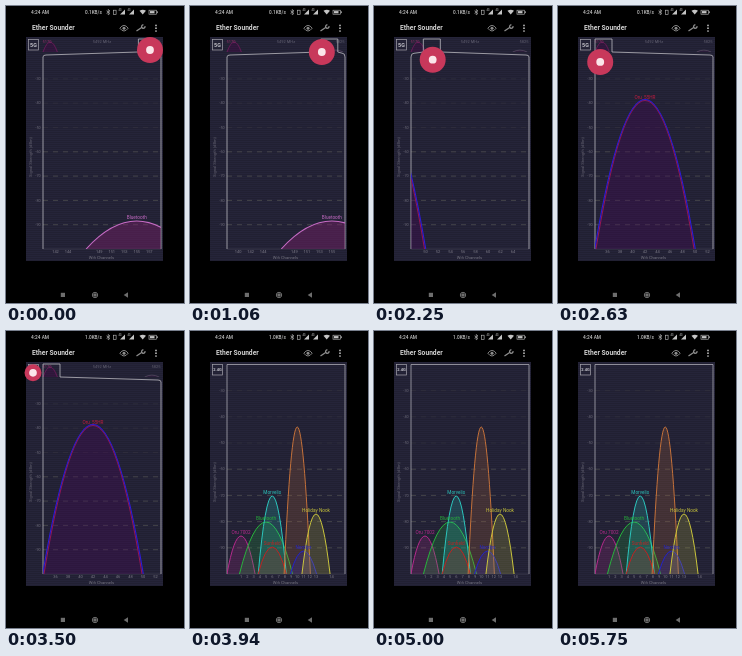
Write an HTML page with a canvas that moves like this. It is 178 px wide and 297 px high and loops after 5.81 s.

```html
<!DOCTYPE html>
<html lang="en">
<head>
<meta charset="utf-8">
<style>
  html, body { margin: 0; width: 100%; height: 100%; overflow: hidden; background: #000; }
  canvas { display: block; width: 100vw; height: 100vh; }
</style>
</head>
<body>
<canvas id="stage"></canvas>
<script>
const W = 178, H = 297, LOOP = 5810, STEP = 62.5;
const LEFT = 37, RIGHT = 155, FLOOR = 243, CH = 6.25; // plot edges, pixels per channel
const STRIP = { top: 33, bottom: 46, first: 34, scale: 0.9, box: 17 };
const SWITCH_AT = 3680;

const canvas = document.getElementById('stage');
const c = canvas.getContext('2d');

const wide = [
  { ch: 42, half: 7.85, peak: 148.5, color: '#a01a50', fill: 'rgba(80,10,80,.22)', name: 'Oru_55HR', label: '#c01c40' },
  { ch: 42, half: 8.05, peak: 149.5, color: '#2c1cd8', fill: 'rgba(60,0,100,.14)' },
  { ch: 155, half: 8.1, peak: 28, color: '#c56bc4', fill: 'rgba(130,30,110,.4)', name: 'Bluetooth', label: '#c56bc4' }
];
const narrow = [
  { ch: 1, half: 2.25, peak: 38, color: '#b52a8c', name: 'Oru 7002' },
  { ch: 5, half: 4.25, peak: 52, color: '#27b33c', name: 'Bluetooth' },
  { ch: 6, half: 2.25, peak: 78, color: '#2cc5bd', name: 'Morvelis' },
  { ch: 6, half: 2.25, peak: 27, color: '#c02222', name: 'Sunfield' },
  { ch: 10, half: 2.1, peak: 147, color: '#c4713a' },
  { ch: 11, half: 2.1, peak: 23, color: '#2323c8', name: 'Nordlys' },
  { ch: 13, half: 2.25, peak: 60, color: '#c9c43c', name: 'Holiday Nook' }
];

// Linear interpolation through [time, value] points.
function track(points, t) {
  let i = 1;
  while (i < points.length - 1 && t > points[i][0]) i++;
  const [t0, a] = points[i - 1], [t1, b] = points[i];
  return a + (b - a) * Math.min(1, Math.max(0, (t - t0) / (t1 - t0)));
}

const boxPath = [[0, 132.4], [690, 138], [1060, 131], [1810, 71], [2500, 37]];
const touchX = [[0, 144], [690, 147.5], [1060, 132], [1810, 78], [2630, 42]];
const touchY = [[0, 44], [1060, 46], [1810, 51], [2630, 56]];
const dragSize = [[2800, 13], [2950, 0]];
const tapSize = [[3370, 0], [3500, 8.5], [3560, 8.5], [3690, 0]];

function text(s, x, y, size, color, align = 'center', weight = 400) {
  c.font = `${weight} ${size}px Roboto, sans-serif`;
  c.textAlign = align;
  c.textBaseline = 'middle';
  c.fillStyle = color;
  c.fillText(s, x, y);
}

function line(points, color, width = 0.7) {
  c.beginPath();
  points.forEach(([x, y]) => c.lineTo(x, y));
  c.strokeStyle = color;
  c.lineWidth = width;
  c.stroke();
}

function polygon(points, color) {
  c.beginPath();
  points.forEach(([x, y]) => c.lineTo(x, y));
  c.fillStyle = color;
  c.fill();
}

function disc(x, y, r, color) {
  c.beginPath();
  c.arc(x, y, r, 0, 7);
  c.fillStyle = color;
  c.fill();
}

function clip(x, y, w, h, draw) {
  c.save();
  c.beginPath();
  c.rect(x, y, w, h);
  c.clip();
  draw();
  c.restore();
}

function parabola(x, floor, half, peak, color, fill, width = 1) {
  c.beginPath();
  c.moveTo(x - half, floor);
  c.quadraticCurveTo(x, floor - 2 * peak, x + half, floor);
  c.fillStyle = fill;
  c.fill();
  c.strokeStyle = color;
  c.lineWidth = width;
  c.stroke();
}

function statusBar(t) {
  const grey = '#c4c4c4';
  text('4:24 AM', 25, 6.2, 4.8, grey, 'left', 500);
  text(t < 3190 ? '0.1KB/s' : '1.0KB/s', 79, 6.2, 4.7, grey, 'left', 500);
  line([[100.5, 4.8], [104, 7.4], [102.2, 8.8], [102.2, 3.5], [104, 4.9], [100.5, 7.4]], grey, 0.6);
  c.strokeRect(107.5, 4.2, 2.6, 4.2);
  for (const x of [113, 122]) {
    text('4G', x + 1, 4.6, 2.6, grey);
    polygon([[x + 1, 8.6], [x + 6, 8.6], [x + 6, 3.6]], grey);
  }
  c.beginPath();
  c.moveTo(133.5, 4.8);
  c.quadraticCurveTo(136.7, 2.5, 140, 4.8);
  c.lineTo(136.7, 8.6);
  c.fill();
  c.strokeRect(143, 4.2, 7.5, 4);
  c.fillRect(144, 5.1, 4.5, 2.2);
  c.fillRect(150.9, 5.3, 0.8, 1.8);
}

function appBar() {
  const grey = '#8e8e8e';
  text('Ether Sounder', 26, 22.3, 6.7, '#d0d0d0', 'left', 700);
  c.strokeStyle = grey;
  c.lineWidth = 0.9;
  c.beginPath();
  c.moveTo(113.8, 22.2);
  c.quadraticCurveTo(118, 16.6, 122.2, 22.2);
  c.quadraticCurveTo(118, 27.8, 113.8, 22.2);
  c.stroke();
  disc(118, 22.2, 1.5, grey);
  line([[130.5, 25], [136, 21.3]], grey, 1.3);
  c.beginPath();
  c.arc(137.3, 20.6, 1.7, -0.3, 4.8);
  c.stroke();
  for (const y of [19.4, 22.2, 25]) disc(150, y, 0.85, '#c4c4c4');
}

function navBar() {
  const grey = '#6e6e6e';
  c.fillStyle = c.strokeStyle = grey;
  c.fillRect(54.8, 286.8, 4.2, 4.2);
  c.beginPath();
  c.arc(89, 289, 2.7, 0, 7);
  c.lineWidth = 1;
  c.stroke();
  disc(89, 289, 1.8, grey);
  polygon([[122, 286.3], [122, 291.7], [117.7, 289]], grey);
}

function panel(label, spacing) {
  c.fillStyle = '#252439';
  c.fillRect(20, 31, 137, 224);
  c.fillStyle = 'rgba(0,0,0,.12)';
  for (let y = 32; y < 255; y += 2) c.fillRect(20, y, 137, 1);
  c.setLineDash([5, 5]);
  for (let k = 1; k < 8; k++) {
    const y = FLOOR - k * spacing;
    line([[LEFT, y], [RIGHT, y]], k < 5 ? '#5c5b58' : '#34333f', 0.6);
    text(-100 + k * 10, 32, y, 3.8, '#6c6a78');
  }
  c.setLineDash([]);
  line([[LEFT, FLOOR], [RIGHT, FLOOR]], '#4b4958', 0.5);
  text('Wifi Channels', 95.5, 252.2, 4.2, '#777582');
  c.save();
  c.translate(25, 151);
  c.rotate(-Math.PI / 2);
  text('Signal Strength (dBm)', 0, 0, 4.1, '#656371');
  c.restore();
  c.strokeStyle = '#a5a4ad';
  c.lineWidth = 0.7;
  c.strokeRect(22.5, 33.5, 10, 10.5);
  text(label, 27.5, 39, label.length > 2 ? 4 : 5.4, '#c4c3ca', 'center', 700);
}

function channelLabels(from, to, step, xOf) {
  for (let ch = from; ch <= to; ch += step) {
    const x = xOf(ch);
    if (x > 42 && x < 153) text(ch, x, 246.3, 4, '#7b7986');
  }
}

function strip(left) {
  const { top, bottom, first, scale, box } = STRIP;
  const mapX = ch => LEFT + (ch - first) * scale;
  clip(LEFT - 1, top - 1, 120, bottom - top + 1, () => {
    for (const n of wide)
      parabola(mapX(n.ch), bottom, n.half * scale, n.peak / 15,
        n.ch === 42 ? '#6a1d5a' : '#66586f', 'rgba(90,0,80,.15)', 0.6);
  });
  text('5170', 41, 36, 4, '#92316a');
  text('5492 MHz', 96, 36, 4, '#615f70');
  text('5825', 150, 36, 4, '#615f70');

  // Overview window flaring out into the sides of the main plot.
  const right = left + box;
  const edgeY = d => bottom + 1 + Math.min(2, d * 0.025);
  c.beginPath();
  c.moveTo(LEFT, FLOOR);
  c.lineTo(LEFT, 51);
  c.quadraticCurveTo(LEFT, edgeY(left - LEFT), Math.min(LEFT + 3, left), edgeY(left - LEFT));
  c.lineTo(left, bottom);
  c.lineTo(left, top);
  c.lineTo(right, top);
  c.lineTo(right, bottom);
  c.lineTo(Math.max(RIGHT - 3, right), edgeY(RIGHT - right));
  c.quadraticCurveTo(RIGHT, edgeY(RIGHT - right), RIGHT, 51);
  c.lineTo(RIGHT, FLOOR);
  c.strokeStyle = '#bab9bf';
  c.lineWidth = 0.8;
  c.stroke();
}

function wideBand(t) {
  const left = track(boxPath, t);
  const firstShown = STRIP.first + (left - LEFT) / STRIP.scale;
  const xOf = ch => LEFT + (ch - firstShown) * CH;
  panel('5G', 24.3);
  channelLabels(36, 64, 2, xOf);
  channelLabels(100, 144, 2, xOf);
  channelLabels(149, 165, 2, xOf);
  strip(left);
  clip(LEFT, 48, RIGHT - LEFT, FLOOR - 48, () => {
    for (const n of wide) {
      const x = xOf(n.ch);
      parabola(x, FLOOR, n.half * CH, n.peak, n.color, n.fill, 1.1);
      if (n.name) text(n.name, x, FLOOR - n.peak - 3, 4.7, n.label);
    }
  });
}

function narrowBand() {
  const xOf = ch => 51 + (ch - 1) * CH;
  panel('2.4G', 26.2);
  channelLabels(1, 13, 1, xOf);
  text(14, 141.5, 246.3, 4, '#7b7986');
  line([[LEFT, FLOOR], [LEFT, 33.5], [RIGHT, 33.5], [RIGHT, FLOOR]], '#aaa9b1', 0.8);
  clip(LEFT, 33, RIGHT - LEFT, FLOOR - 33, () => {
    for (const n of narrow) {
      const shape = [xOf(n.ch), FLOOR, n.half * CH, n.peak];
      c.globalAlpha = 0.2;
      parabola(...shape, 'transparent', n.color);
      c.globalAlpha = 1;
      parabola(...shape, n.color, 'transparent');
    }
  });
  for (const n of narrow)
    if (n.name) text(n.name, xOf(n.ch), FLOOR - n.peak - 3, 4.7, n.color);
}

function finger(x, y, r, dot) {
  if (r <= 0) return;
  disc(x, y, r, '#c8385b');
  disc(x, y, r * dot, '#fbe6ea');
}

function draw(t) {
  const ratio = devicePixelRatio || 1;
  const w = Math.round(innerWidth * ratio), h = Math.round(innerHeight * ratio);
  if (canvas.width !== w || canvas.height !== h) {
    canvas.width = w;
    canvas.height = h;
  }
  c.setTransform(w / W, 0, 0, h / H, 0, 0);
  c.fillStyle = '#000';
  c.fillRect(0, 0, W, H);
  statusBar(t);
  appBar();
  if (t < SWITCH_AT) wideBand(t);
  else narrowBand();
  navBar();
  finger(track(touchX, t), track(touchY, t), track(dragSize, t), 0.3);
  finger(27, 41.8, track(tapSize, t), 0.45);
}

const start = performance.now();
function frame() {
  const t = (performance.now() - start) % LOOP;
  draw(Math.floor((t + 3) / STEP) * STEP);
  requestAnimationFrame(frame);
}
frame();
</script>
</body>
</html>
```
